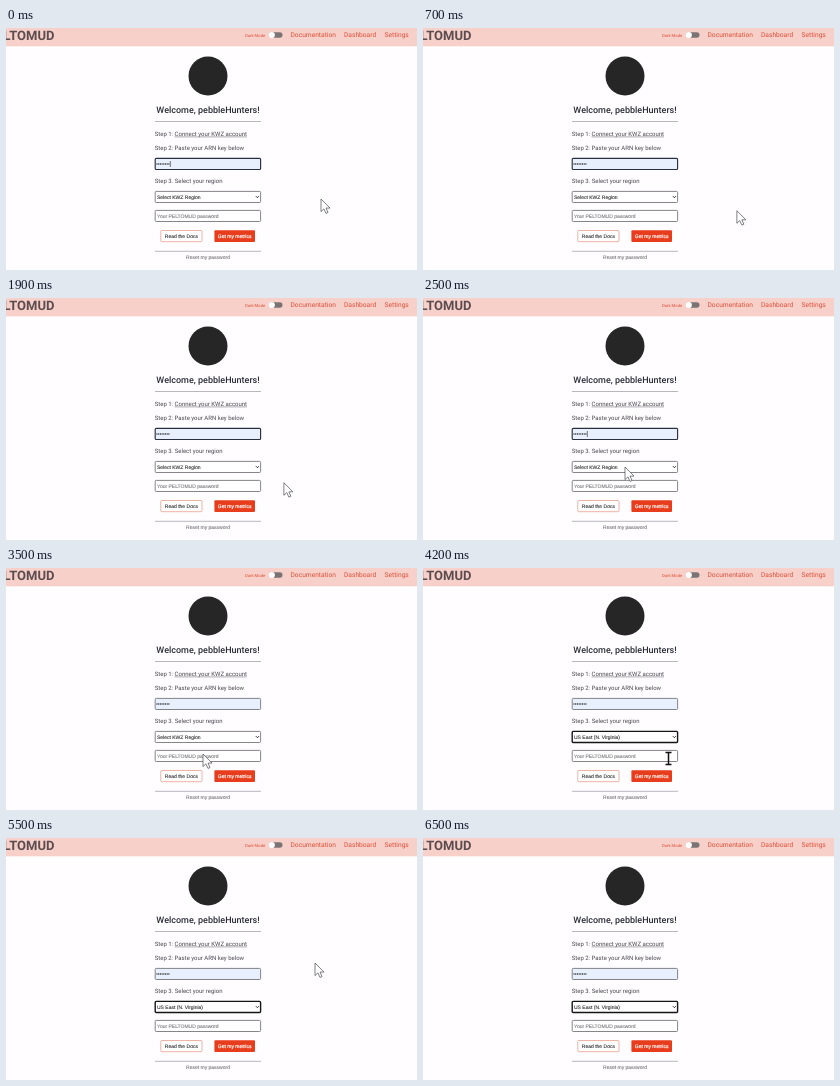
Recreate the animation shown at these times as an HTML page. Size 411x242 px, loop 6.6 s.

```html
<!DOCTYPE html>
<html lang="en">
<head>
<meta charset="utf-8">
<title>Sign-up form</title>
<style>
  html, body { margin: 0; width: 100%; height: 100%; overflow: hidden; background: #fffdff; }
  svg { display: block; width: 411px; height: 242px; }
  text { font-family: Roboto, sans-serif; font-size: 6px; fill: #4c4850; text-rendering: geometricPrecision; }
  .nav { font-size: 6.67px; fill: #e0503a; }
  .mode { font-size: 4.2px; fill: #e0503a; }
  .brand { font-size: 13px; font-weight: 700; fill: #5c4c4f; text-anchor: end; }
  .title { font-size: 9px; font-weight: 500; fill: #2a2d38; text-anchor: middle; }
  .ui { font-family: "Liberation Sans", Arial, sans-serif; font-size: 5px; fill: #2c2c2e; stroke: #2c2c2e; stroke-width: .1; }
  .hint { fill: #77757a; stroke: #77757a; }
  .invert { fill: #fff; stroke: #fff; stroke-width: .2; }
  .mid { text-anchor: middle; }
  .field { fill: #fff; stroke: #66666b; stroke-width: .8; }
  .field.filled.focus { stroke: #2a3040; stroke-width: 1.15; }
  .field.filled { fill: #e8f0fe; }
  .field.focus { stroke: #151515; stroke-width: 1.4; }
  .rule { stroke: #aaa5ae; stroke-width: .8; }
</style>
</head>
<body>
<svg viewBox="0 0 411 242">
  <rect width="411" height="242" fill="#fffdff"/>
  <rect width="411" height="18.3" fill="#f6d0c9"/>
  <text class="brand" x="48.5" y="11.8">PELTOMUD</text>
  <text class="mode" x="239" y="8.5">Dark Mode</text>
  <rect x="263" y="4.3" width="13.5" height="5.4" rx="2.7" fill="#7b7473"/>
  <circle cx="265.8" cy="7" r="3.1" fill="#fff"/>
  <text class="nav" x="284.5" y="9.2">Documentation</text>
  <text class="nav" x="338" y="9.2">Dashboard</text>
  <text class="nav" x="378.5" y="9.2">Settings</text>

  <circle cx="202" cy="48" r="19.5" fill="#262626"/>
  <text class="title" x="202" y="85.2">Welcome, pebbleHunters!</text>
  <path class="rule" d="M149 93.5H255M149 223.3H255"/>

  <text x="148.7" y="108">Step 1: Connect your KWZ account</text>
  <path d="M168.6 108.9H241" stroke="#5c5860" stroke-width=".5"/>
  <text x="148.7" y="122.2">Step 2: Paste your ARN key below</text>
  <rect id="key" class="field filled" x="149.2" y="130.4" width="105.4" height="11.1" rx="1"/>
  <path d="M151 136H163" stroke="#222" stroke-width="1.3" stroke-linecap="round" stroke-dasharray="0 1.7"/>
  <path id="caret" d="M164.3 133V139" stroke="#222" stroke-width=".6"/>

  <text x="148.7" y="155.3">Step 3. Select your region</text>
  <rect id="region" class="field" x="149.2" y="163.4" width="105.4" height="11.1" rx="1"/>
  <text id="choice" class="ui" x="151" y="170.7"></text>
  <path d="M249.9 168.2L251.4 169.7L252.9 168.2" fill="none" stroke="#222" stroke-width="1"/>

  <rect class="field" x="149.2" y="182.4" width="105.4" height="11.1" rx="1"/>
  <text class="ui hint" x="151" y="189.7">Your PELTOMUD password</text>

  <rect x="154.8" y="202.5" width="41.2" height="11.2" rx="1" fill="#fff" stroke="#e9a08f" stroke-width=".8"/>
  <text class="ui mid" x="175.4" y="209.8">Read the Docs</text>
  <rect x="208.4" y="202.2" width="40.6" height="11.8" rx="1" fill="#e83d1c"/>
  <text class="ui mid invert" x="228.6" y="209.8">Get my metrics</text>
  <text class="ui hint mid" x="202" y="231.2">Reset my password</text>

  <path id="arrow" d="M0 0V12.6L2.9 9.9L5 14.4L7 13.5L5 9.1H9Z" fill="#fff" stroke="#4a4a50" stroke-width=".7" stroke-linejoin="round"/>
  <path id="beam" d="M-3 -6H3M0 -6V6M-3 6H3" fill="none" stroke="#111" stroke-width="1.5"/>
</svg>
<script>
  const LOOP = 6600, STEP = 100, BLINK = 530;
  const OPENED = 2600, CHOSEN = 3600;

  // time, x, y of the pointer
  const path = [
    [0, 315, 171], [1300, 313, 192], [1600, 313, 192], [2400, 202, 169],
    [2700, 202, 169], [3300, 197, 186], [3700, 197, 186], [4100, 245.5, 190.5],
    [4500, 245.5, 190.5], [5300, 309, 125], [5700, 309, 125], [6200, 416, 112], [LOOP, 416, 112]
  ];
  const el = id => document.getElementById(id);
  const [key, caret, region, choice, arrow, beam] =
    ["key", "caret", "region", "choice", "arrow", "beam"].map(el);
  const show = (node, on) => node.setAttribute("visibility", on ? "visible" : "hidden");

  function pointerAt(t) {
    const i = path.findIndex(p => p[0] > t);
    const [t0, x0, y0] = path[i - 1], [t1, x1, y1] = path[i];
    const u = (t - t0) / (t1 - t0), e = u * u * (3 - 2 * u);
    return [x0 + (x1 - x0) * e, y0 + (y1 - y0) * e];
  }

  function draw(t) {
    const [x, y] = pointerAt(t);
    const typing = t >= CHOSEN && x > 149 && x < 255 && y > 182 && y < 194;
    for (const node of [arrow, beam]) node.setAttribute("transform", `translate(${x} ${y})`);
    show(arrow, !typing);
    show(beam, typing);
    show(caret, t < OPENED && t % (2 * BLINK) < BLINK);
    key.classList.toggle("focus", t < OPENED);
    region.classList.toggle("focus", t >= CHOSEN);
    choice.textContent = t < CHOSEN ? "Select KWZ Region" : "US East (N. Virginia)";
  }

  const start = performance.now();
  function tick() {
    const t = (performance.now() - start) % LOOP;
    draw(Math.floor(t / STEP) * STEP);
    requestAnimationFrame(tick);
  }
  tick();
</script>
</body>
</html>
```
